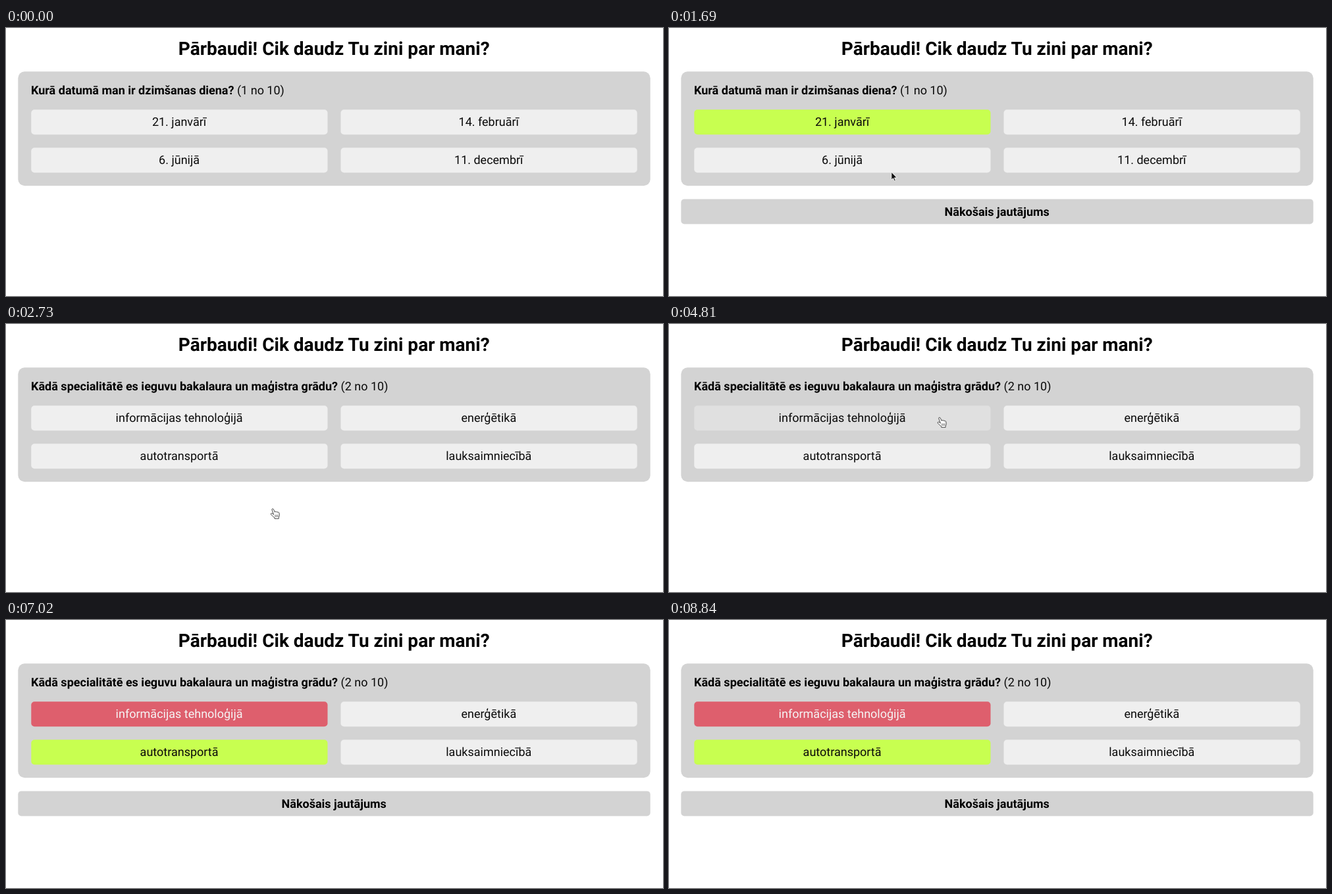
Animation, 998 px wide and 408 px high, one loop 8.97 s. Source, as an HTML page:

```html
<!DOCTYPE html>
<html lang="lv">
<head>
<meta charset="utf-8">
<title>Pārbaudi!</title>
<style>
  html, body { margin: 0; width: 100%; height: 100%; overflow: hidden; background: #fff; }
  svg { display: block; width: 998px; height: 408px; }
  text { font: 18px Roboto, sans-serif; text-rendering: geometricPrecision; fill: #0a0a0a; }
  .mid { text-anchor: middle; }
  .bold { font-weight: 700; fill: #000; }
  .title { font-size: 28px; }
</style>
</head>
<body>
<svg viewBox="0 0 998 408">
  <text class="mid bold title" x="498.2" y="41">Pārbaudi! Cik daudz Tu zini par mani?</text>
  <rect x="18.3" y="66.2" width="960.4" height="174" rx="10" fill="#d3d3d3"/>
  <text x="38" y="101"><tspan id="ask" class="bold"></tspan><tspan id="count"></tspan></text>
  <g id="answers"></g>
  <g id="next">
    <rect x="18.3" y="260.4" width="960.4" height="38" rx="5" fill="#d3d3d3"/>
    <text class="mid bold" x="498.2" y="285.5">Nākošais jautājums</text>
  </g>
  <g id="cursor" stroke-linejoin="round" stroke-linecap="round">
    <path id="arrow" d="M.8.6V12.2L3.5 9.7 5.5 14.2 7.3 13.4 5.4 9H9Z" fill="#111" stroke="#fff" stroke-width=".9"/>
    <g id="hand" fill="#fff" stroke="#333" stroke-width=".9">
      <path d="M4.9 9.8 2.5 3C2 1.3 4 .4 4.8 2L6.8 6.3C7 5 8.7 5 9 6.4 9.6 5.3 11 5.6 11.2 6.9 12.2 6.1 13.4 6.8 13.5 8L13.8 11.2C13.9 12.7 12.9 13.4 12.8 14.4V16.3H6.5V15C4.8 13.6 2.7 11.9 1.2 10.1.1 8.7 1.5 7.6 2.8 8.3Z"/>
      <path d="M7.4 10.8V13.6M9.4 10.8V13.6M11.4 10.8V13.6" fill="none" stroke-width=".7"/>
    </g>
  </g>
</svg>
<script>
const LOOP = 8970;
const PLAIN = '#efefef', HOVER = '#e0e0e0', RIGHT = '#c8ff50', WRONG = '#de5f6d';
const $ = id => document.getElementById(id);

const quiz = [
  { ask: 'Kurā datumā man ir dzimšanas diena?',
    options: ['21. janvārī', '14. februārī', '6. jūnijā', '11. decembrī'],
    right: 0, picked: 0, start: 0, click: 1040 },
  { ask: 'Kādā specialitātē es ieguvu bakalaura un maģistra grādu?',
    options: ['informācijas tehnoloģijā', 'enerģētikā', 'autotransportā', 'lauksaimniecībā'],
    right: 2, picked: 0, start: 2600, click: 5590 }
];

// time, x, y, shape, hovered control
const moves = [
  [0], [130, 717, 31, 'arrow'], [260, 640, 58, 'arrow'], [390, 500, 92, 'arrow'],
  [520, 330, 127, 'hand', 0], [650, 196, 148, 'hand', 0], [780, 136, 158, 'hand', 0],
  [1560, 235, 188, 'hand'], [1690, 337, 219, 'arrow'], [1820, 376, 247, 'arrow'],
  [1950, 396, 272, 'hand', 'next'], [2080, 401.5, 280, 'hand', 'next'],
  [2990, 412, 277, 'arrow'], [3120, 430, 267, 'arrow'], [3250, 457, 254, 'arrow'],
  [3380, 492, 239, 'arrow'], [3510, 530, 222, 'arrow'], [3640, 568, 204, 'hand', 3],
  [3770, 590, 194, 'hand', 3], [3900, 662, 165, 'arrow'], [4030, 749, 133, 'hand', 1],
  [4550, 640, 137, 'hand', 1], [4680, 495, 140, 'arrow'], [4810, 407.3, 141, 'hand', 0],
  [6240]
];

function add(tag, attrs) {
  const el = document.createElementNS('http://www.w3.org/2000/svg', tag);
  for (const key in attrs) el.setAttribute(key, attrs[key]);
  return $('answers').appendChild(el);
}

const buttons = [0, 1, 2, 3].map(i => {
  const x = i % 2 ? 508.5 : 38.3, y = i < 2 ? 124.2 : 182.2;
  return {
    box: add('rect', { x, y, width: 450.2, height: 38, rx: 5 }),
    label: add('text', { class: 'mid', x: x + 224.8, y: y + 25.2 })
  };
});

const show = (el, on) => { el.style.display = on ? '' : 'none'; };
const latest = (list, t, time) => list.filter(item => time(item) <= t).pop();

function draw(t) {
  const q = latest(quiz, t, item => item.start);
  const [, x, y, shape, hover] = latest(moves, t, item => item[0]);
  const done = t >= q.click;

  $('ask').textContent = q.ask;
  $('count').textContent = ` (${quiz.indexOf(q) + 1} no 10)`;
  buttons.forEach(({ box, label }, i) => {
    let fill = !done && hover === i ? HOVER : PLAIN;
    if (done && i === q.picked) fill = WRONG;
    if (done && i === q.right) fill = RIGHT;
    box.style.fill = fill;
    label.style.fill = fill === WRONG ? '#f5f5f5' : '';
    label.textContent = q.options[i];
  });

  show($('next'), done);
  $('next').firstElementChild.style.fill = hover === 'next' ? '#c0c0c0' : '';
  show($('cursor'), shape);
  if (shape) {
    $('cursor').setAttribute('transform', `translate(${x} ${y})`);
    show($('arrow'), shape === 'arrow');
    show($('hand'), shape === 'hand');
  }
}

const begin = performance.now();
function tick() {
  draw((performance.now() - begin) % LOOP);
  requestAnimationFrame(tick);
}
tick();
</script>
</body>
</html>
```
